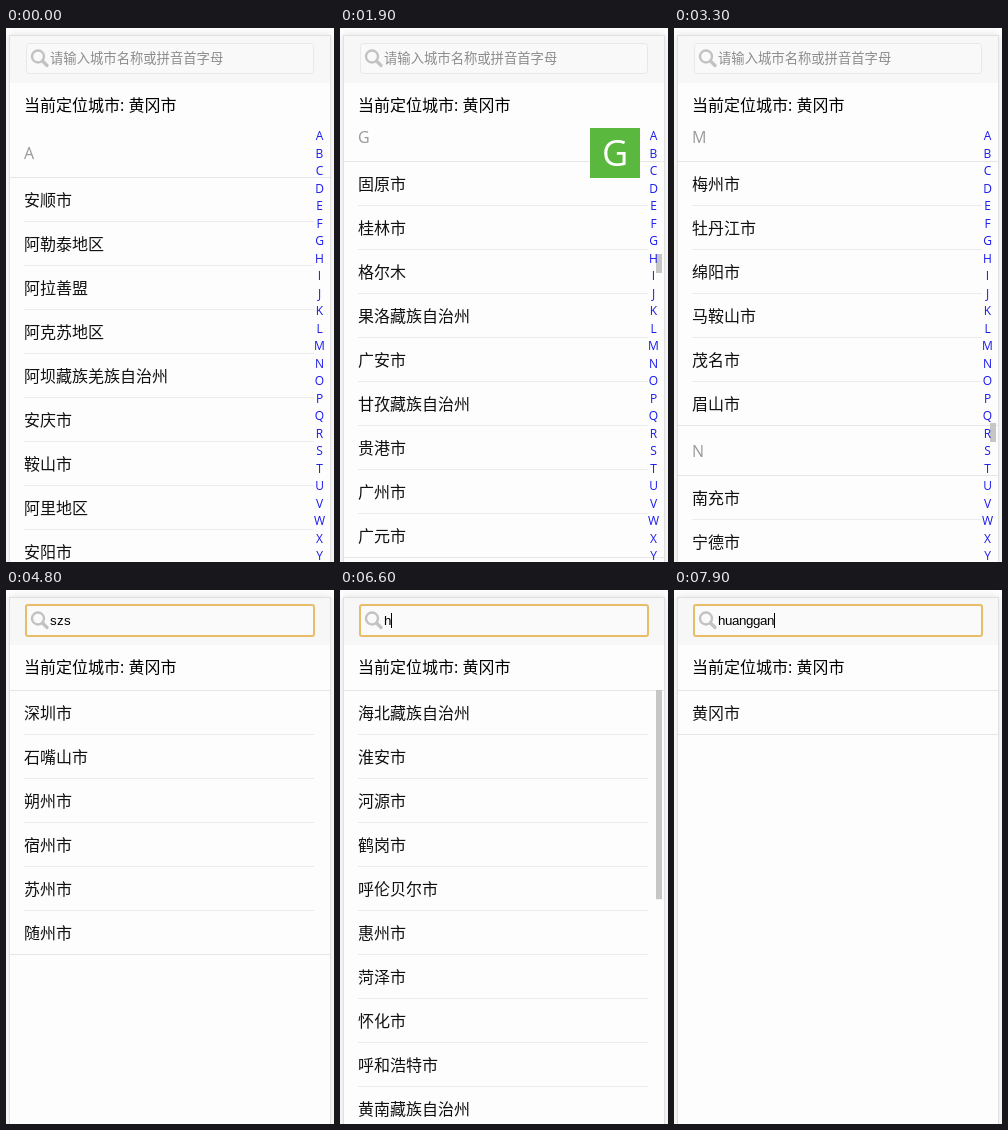
Recreate the animation shown at these times as an HTML page. Size 328x534 px, loop 8 s.

```html
<!DOCTYPE html>
<html lang="zh-CN">
<head>
<meta charset="utf-8">
<title>城市选择</title>
<style>
html, body { margin: 0; height: 100%; overflow: hidden; background: #fff; }
svg { display: block; width: 328px; height: 534px; font: 16px "Open Sans", "Noto Sans CJK SC", "Noto Sans CJK", sans-serif; }
.small { font-size: 13.333px; }
.typed { font: 13.333px "Liberation Sans", Arial, sans-serif; }
.index { font-size: 12px; fill: #1a1aee; text-anchor: middle; }
.badge { font-size: 36px; fill: #fff; text-anchor: middle; }
</style>
</head>
<body>
<svg id="stage" viewBox="0 0 328 534"></svg>
<script>
const LOOP = 8000, TOP = 100, ROW = 44, HEAD = 50, VIEW = 470;

const groups = {
  A: '安顺市 阿勒泰地区 阿拉善盟 阿克苏地区 阿坝藏族羌族自治州 安庆市 鞍山市 阿里地区 安阳市 安康市',
  C: '沧州市 承德市 长治市 赤峰市 朝阳市 长春市 常州市 滁州市 池州市',
  E: '恩施土家族苗族自治州 鄂尔多斯市 鄂州市',
  F: '抚顺市 佛山市 防城港市 福州市 阜阳市',
  G: '固原市 桂林市 格尔木 果洛藏族自治州 广安市 甘孜藏族自治州 贵港市 广州市 广元市',
  H: '海北藏族自治州 淮安市 河源市 鹤岗市 呼伦贝尔市 惠州市 菏泽市 怀化市 呼和浩特市',
  J: '酒泉市 金华市 锦州市 吉林市 济南市 嘉兴市 江门市 九江市 荆州市',
  K: '奎屯 克拉玛依市 康定 凯里 昆明市 克孜勒苏柯尔克孜自治州 开封市 喀什地区',
  L: '拉萨市 临沂市 兰州市 柳州市 洛阳市 丽江市 连云港市 龙岩市 六安市',
  M: '梅州市 牡丹江市 绵阳市 马鞍山市 茂名市 眉山市',
  N: '南充市 宁德市 南京市'
};
const follower = { E: 'F', K: 'L', M: 'N' };
const thumbTop = { A: 100, C: 138, E: 190, G: 226, H: 255, J: 299, K: 337, L: 353, M: 395 };

// query -> [total matches, first visible matches]
const matches = {
  s: [30, '深圳市 石嘴山市 朔州市 上海市 宿州市 沈阳市 苏州市 随州市 汕头市 三亚市'],
  sz: [6, '深圳市 石嘴山市 朔州市 宿州市 苏州市 随州市'],
  h: [24, groups.H + ' 黄南藏族自治州'],
  hu: [14, '淮安市 呼伦贝尔市 惠州市 怀化市 呼和浩特市 黄南藏族自治州 黄石市 淮南市 黄冈市 湖州市'],
  hua: [8, '淮安市 怀化市 黄南藏族自治州 黄石市 淮南市 黄冈市 淮北市 黄山市'],
  huan: [4, '黄南藏族自治州 黄石市 黄冈市 黄山市'],
  huangg: [1, '黄冈市']
};

const script = [
  [0, { letter: 'A', offset: 0, badge: '', bar: 0, query: null, caret: 1 }],
  [1000, { offset: 16, badge: 'A', bar: 1 }],
  [1500, { letter: 'C', badge: 'C' }],
  [1600, { letter: 'E', badge: 'E' }],
  [1900, { letter: 'G', badge: 'G' }],
  [2000, { letter: 'H', badge: 'H' }],
  [2100, { badge: 'I' }],
  [2300, { letter: 'J', badge: 'J' }],
  [2400, { letter: 'K', badge: 'K' }],
  [2500, { letter: 'L', badge: 'L' }],
  [2600, { letter: 'M', badge: 'M' }],
  [3300, { badge: '' }],
  [3400, { bar: .6 }],
  [3500, { bar: 0 }],
  [3600, { query: '' }],
  [3800, { query: 's', bar: 1 }],
  [4100, { query: 'sz' }],
  [4300, { query: 'szs' }],
  [4800, { caret: 0 }],
  [5200, { caret: 1 }],
  [5600, { query: 'sz' }],
  [5800, { query: 's' }],
  [6000, { query: '', bar: 0 }],
  [6500, { query: 'h', bar: .5 }],
  [6600, { bar: 1 }],
  [6700, { query: 'hu' }],
  [6800, { query: 'hua' }],
  [6900, { query: 'huan' }],
  [7100, { query: 'huang' }],
  [7500, { query: 'huangg' }],
  [7800, { query: 'huangga' }],
  [7900, { query: 'huanggan' }]
];

const rect = (x, y, w, h, fill, more = '') =>
  `<rect x="${x}" y="${y}" width="${w}" height="${h}" fill="${fill}" ${more}/>`;
const text = (x, y, str, more = '') => `<text x="${x}" y="${y}" ${more}>${str}</text>`;
const line = (y, full) => full ? rect(4, y, 320, 1, '#e6e6e6') : rect(18, y, 290, 1, '#ececec');
const thumb = (y, h, opacity) => rect(316, y, 6, h, '#c6c6c6', `opacity="${opacity}"`);

const rows = (y, names) => names.split(' ').map((name, i, all) =>
  text(18, y + i * ROW + 28, name, 'fill="#111"') +
  line(y + i * ROW + ROW - 1, i === all.length - 1)).join('');

function group(letter, y) {
  const next = follower[letter];
  const end = y + HEAD + groups[letter].split(' ').length * ROW;
  return text(18, y + 30.5, letter, 'fill="#999"') + line(y + HEAD - 1, true) +
    rows(y + HEAD, groups[letter]) + (next ? group(next, end) : '');
}

function cityList({ letter, offset, badge, bar }) {
  const index = [...'ABCDEFGHIJKLMNOPQRSTUVWXYZ']
    .map((c, i) => text(313.5, 112 + i * 17.5, c, 'class="index"')).join('');
  return group(letter, TOP - offset) + thumb(thumbTop[letter], 19, bar) + index +
    (badge && rect(250, 100, 50, 50, '#5ab83f') + text(275, 138, badge, 'class="badge"'));
}

function resultList({ query, bar }) {
  const key = Object.keys(matches).filter(k => query.startsWith(k)).pop();
  const [total, names] = matches[key];
  const height = total * ROW;
  return line(TOP, true) + rows(TOP + 1, names) +
    (height > VIEW ? thumb(TOP, VIEW * VIEW / height, bar) : '');
}

function searchBox({ query, caret }) {
  const focused = query !== null;
  const frame = focused
    ? rect(20, 15, 288, 31, '#fafafa', 'rx="2" stroke="#e8bd6a" stroke-width="2"')
    : rect(20.5, 15.5, 287, 30, '#f9f9f9', 'rx="3" stroke="#e8e8e8"');
  const icon = `<g fill="none" stroke="#c2c2c2"><circle cx="32" cy="28.5" r="6" stroke-width="2.4"/>
    <path d="M36.5 33L41 37.5" stroke-width="3.2" stroke-linecap="round"/></g>`;
  const cells = [...query || ''].map((_, i) => 44 + i * 7).join(' ');
  const content = query
    ? text(cells, 35, query, 'class="typed"')
    : text(44, 35, '请输入城市名称或拼音首字母', 'class="small" fill="#8c8c8c"');
  return frame + icon + content +
    (focused && caret ? rect(44 + 7 * query.length, 23, 1, 15, '#000') : '');
}

const render = state =>
  rect(3.5, 7.5, 321, 540, '#fdfdfd', 'stroke="#e0e0e0" style="filter:drop-shadow(0 0 4px #0002)"') +
  rect(4, 8, 320, 47, '#f7f7f7') + searchBox(state) +
  text(18, 83, '当前定位城市: 黄冈市') +
  (state.query ? resultList(state) : cityList(state));

const stage = document.getElementById('stage');
let shown = -1;

function tick() {
  const time = performance.now() % LOOP;
  const past = script.filter(([start]) => start <= time);
  if (past.length !== shown) {
    shown = past.length;
    stage.innerHTML = render(Object.assign({}, ...past.map(([, change]) => change)));
  }
  requestAnimationFrame(tick);
}
tick();
</script>
</body>
</html>
```
